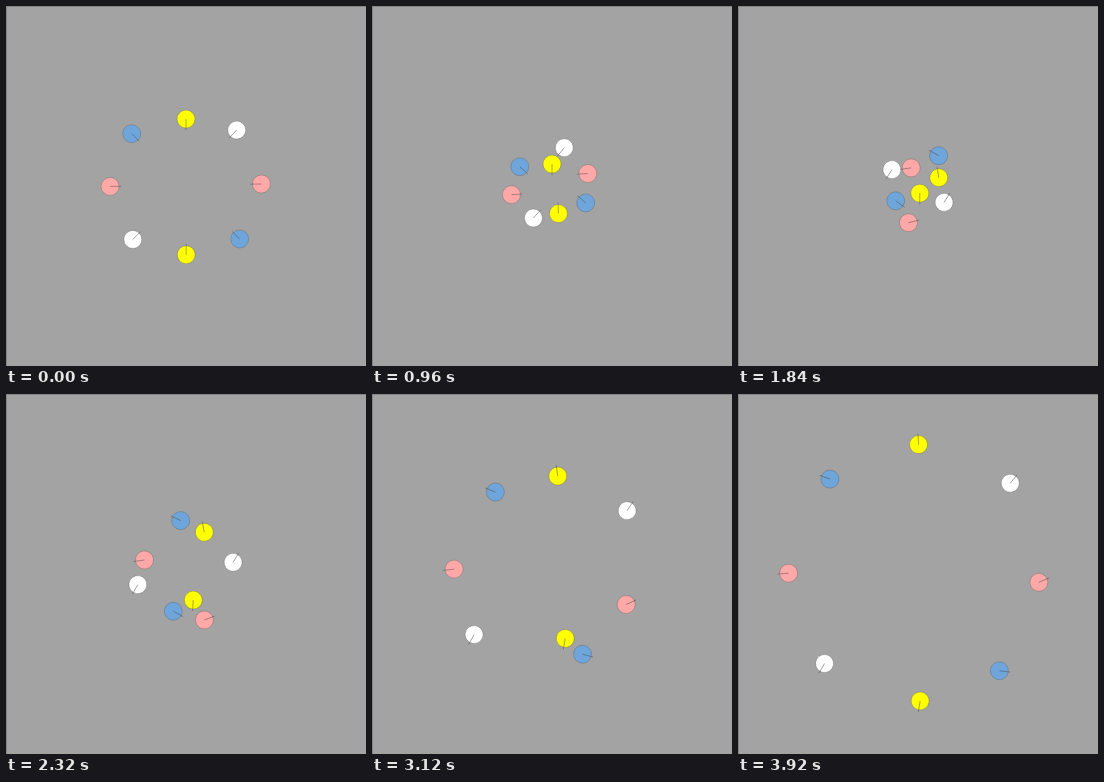
An HTML page with a canvas that plays this animation: 360x360 px, repeating every 4000 ms.

```html
<!DOCTYPE html>
<html lang="en">
<head>
<meta charset="utf-8">
<title>Agents crossing a circle</title>
<style>
  html, body { margin: 0; width: 100%; height: 100%; overflow: hidden; background: #a3a3a3; }
  canvas { display: block; }
</style>
</head>
<body>
<canvas id="stage" width="360" height="360"></canvas>
<script>
const ctx = document.getElementById('stage').getContext('2d');
const SIZE = 360, LOOP = 4, STEP = 0.08;
const RADIUS = 9, TICK = 11, GOAL_DISTANCE = 140;
const PINK = '#ffa8a8', BLUE = '#6ea5da', WHITE = '#ffffff', YELLOW = '#ffff00';

// Goals are spread evenly round the circle. Every agent dodges sideways (sway);
// some also run ahead of or behind the common pace (drift).
// A bump is [pixels, peak second, rise width, fall width].
const agents = [
  { color: PINK, sway: [46, 2.35, 0.76, 0.85], drift: [[-26, 2.8, 1, 0.75]] },
  { color: BLUE, sway: [39, 2.8, 1.08, 0.7], drift: [[-27, 2.6, 0.6, 0.65]] },
  { color: YELLOW, sway: [-14, 2.95, 0.55, 0.5], drift: [[14, 0.9, 0.9, 0.6], [-35, 3, 0.55, 0.4]] },
  { color: WHITE, sway: [30, 1.85, 0.9, 0.95], drift: [] },
  { color: PINK, sway: [18.5, 1.65, 0.78, 0.9], drift: [] },
  { color: YELLOW, sway: [21, 1.93, 0.63, 0.74], drift: [[9, 0.7, 0.9, 0.6]] },
  { color: BLUE, sway: [36.5, 1.95, 0.66, 0.98], drift: [] },
  { color: WHITE, sway: [30, 1.84, 0.58, 0.8], drift: [] }
];
// The two agents heading up are listed in goal order: 225 degrees comes before 270.
[agents[5], agents[6]] = [agents[6], agents[5]];

function bump(t, [size, peak, rise, fall]) {
  const offset = (t - peak) / (t < peak ? rise : fall);
  return size * Math.exp(-offset * offset / 2);
}

// Distance past the centre: steady walking, slowed by the crowd, then catching up.
function pace(t) {
  return -75 + 51.8 * t + bump(t, [-17, 1.5, 0.55, 0.5]) + bump(t, [12, 3.25, 0.4, 0.32]);
}

function drawAgent({ color, sway, drift }, index, t) {
  const along = drift.reduce((sum, shift) => sum + bump(t, shift), pace(t));
  const aside = bump(t, sway);
  ctx.save();
  ctx.translate(SIZE / 2, SIZE / 2);
  ctx.rotate(index * 2 * Math.PI / agents.length);
  ctx.translate(along, aside);
  ctx.rotate(Math.atan2(-aside, GOAL_DISTANCE - along));
  ctx.beginPath();
  ctx.arc(0, 0, RADIUS, 0, 2 * Math.PI);
  ctx.fillStyle = color;
  ctx.fill();
  ctx.strokeStyle = 'rgba(90, 90, 90, 0.4)';
  ctx.stroke();
  ctx.beginPath();
  ctx.moveTo(0, 0);
  ctx.lineTo(TICK, 0);
  ctx.strokeStyle = 'rgba(80, 80, 80, 0.6)';
  ctx.stroke();
  ctx.restore();
}

function render() {
  const t = Math.floor(performance.now() / 1000 % LOOP / STEP) * STEP;
  ctx.fillStyle = '#a3a3a3';
  ctx.fillRect(0, 0, SIZE, SIZE);
  ctx.fillStyle = '#858585';
  ctx.fillRect(0, 0, SIZE, 1);
  ctx.fillRect(0, 0, 1, SIZE);
  ctx.lineWidth = 0.8;
  agents.forEach((agent, index) => drawAgent(agent, index, t));
  requestAnimationFrame(render);
}
render();
</script>
</body>
</html>
```
